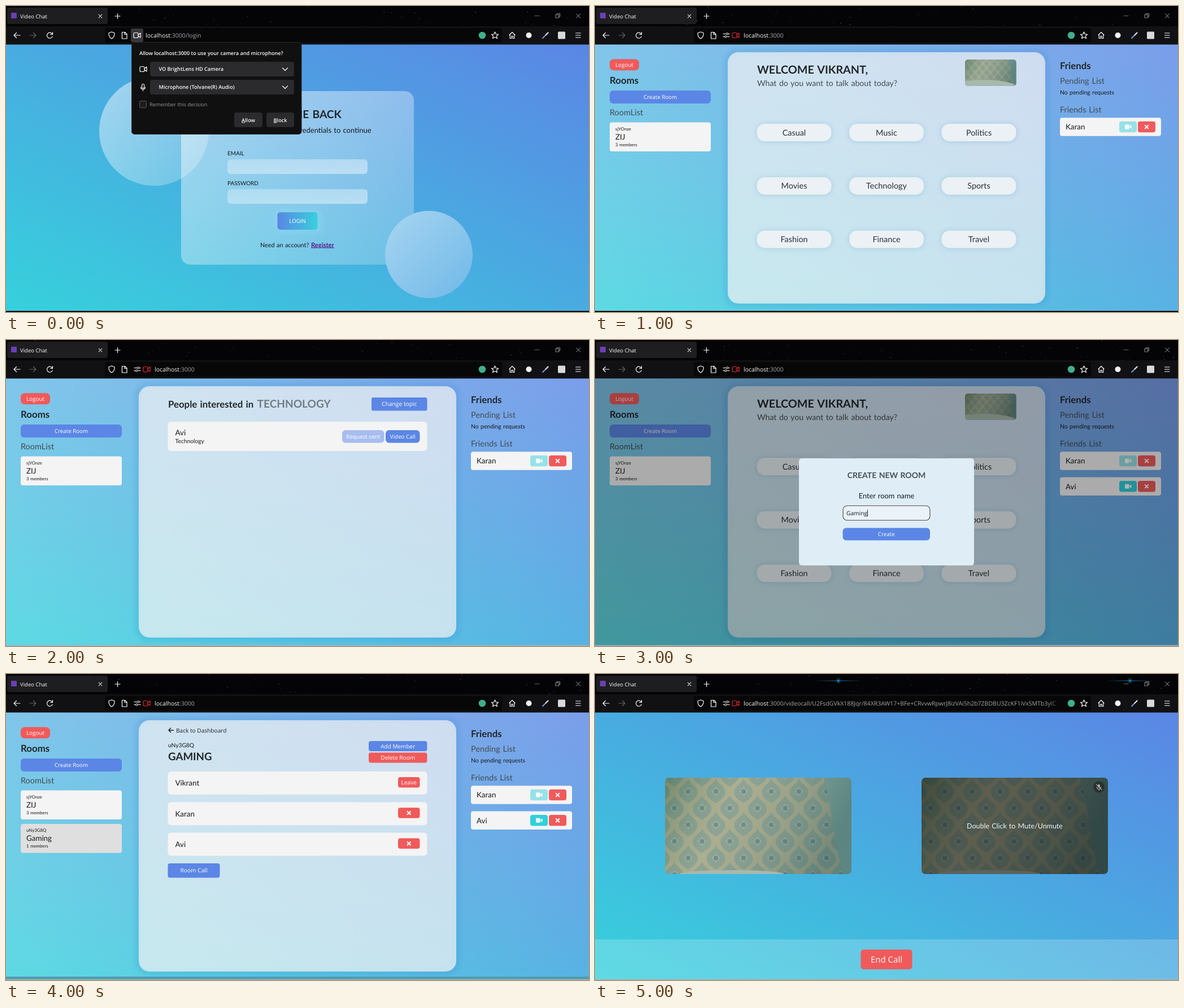
An HTML page that plays this animation: 1032x543 px, repeating every 6 s.

```html
<!DOCTYPE html>
<html lang="en">
<head>
<meta charset="utf-8">
<title>Video Chat</title>
<style>
html, body { margin: 0; width: 100%; height: 100%; overflow: hidden; background: #000; }
svg.stage { display: block; width: 100vw; height: 100vh; }
text { text-rendering: geometricPrecision; white-space: pre; }
.ui { font-family: "Open Sans", "Noto Sans", sans-serif; }
.app { font-family: Lato, "Open Sans", sans-serif; word-spacing: .07em; }
.mid { text-anchor: middle; }
.end { text-anchor: end; }
.b { font-weight: 700; }
.sb { font-weight: 600; }
.line { fill: none; stroke: #fbfbfe; stroke-width: 1.2; stroke-linecap: round; stroke-linejoin: round; }
.scene { visibility: hidden; animation: show 6s step-end infinite; }
@keyframes show {
  0% { visibility: visible; }
  16.667%, 100% { visibility: hidden; }
}
</style>
</head>
<body>
<svg class="stage" viewBox="0 0 1032 543" preserveAspectRatio="none">
  <defs>
    <linearGradient id="sky" x1="0" y1="1" x2="1" y2="0">
      <stop stop-color="#36d1dc"/><stop offset="1" stop-color="#5b86e5"/>
    </linearGradient>
    <linearGradient id="login"><stop stop-color="#5b86e5"/><stop offset="1" stop-color="#36d1dc"/></linearGradient>
    <linearGradient id="veil" x2="1" y2="1">
      <stop stop-color="#fff" stop-opacity=".31"/><stop offset="1" stop-color="#fff" stop-opacity=".08"/>
    </linearGradient>
    <linearGradient id="glass" x2="1" y2="1">
      <stop stop-color="#fff" stop-opacity=".52"/><stop offset="1" stop-color="#fff" stop-opacity=".2"/>
    </linearGradient>
    <linearGradient id="field" x2="1" y2="1">
      <stop stop-color="#fff" stop-opacity=".28"/><stop offset="1" stop-color="#fff" stop-opacity=".46"/>
    </linearGradient>
    <linearGradient id="fade">
      <stop stop-color="#070708" stop-opacity="0"/><stop offset="1" stop-color="#070708"/>
    </linearGradient>
    <linearGradient id="shade" x2="1" y2=".25">
      <stop stop-color="#2f5a3c" stop-opacity=".42"/><stop offset=".38" stop-color="#c8cba4" stop-opacity=".2"/>
      <stop offset="1" stop-color="#3c605c" stop-opacity=".42"/>
    </linearGradient>
    <radialGradient id="glint">
      <stop stop-color="#8fe0ff"/><stop offset=".2" stop-color="#1f78a8" stop-opacity=".7"/>
      <stop offset="1" stop-color="#0a3a58" stop-opacity="0"/>
    </radialGradient>
    <pattern id="cloth" width="49" height="59" patternUnits="userSpaceOnUse" x="41" y="24">
      <rect width="49" height="59" fill="#a5a78b"/>
      <g id="bulb">
        <path d="M24.500 7C28 17 41 20 41 31S30 46 24.500 51C19 46 8 42 8 31S21 17 24.500 7Z" fill="#7f9a91"/>
        <path d="M24.500 22l8 8-8 8-8-8z" fill="#98a79a"/><circle cx="24.500" cy="30" r="4" fill="#57808a"/>
      </g>
      <use href="#bulb" x="-24.500" y="29.500"/><use href="#bulb" x="24.500" y="29.500"/>
      <use href="#bulb" x="-24.500" y="-29.500"/><use href="#bulb" x="24.500" y="-29.500"/>
    </pattern>
    <filter id="soft" x="-20%" y="-40%" width="140%" height="180%"><feGaussianBlur stdDeviation="4"/></filter>
  </defs>
</svg>
<script>
const BLUE = '#5b86e5', RED = '#f05a5b', CARD = '#f4f4f4', INK = '#16191c', DARK = '#22272b', DIM = '#444c53';
const TOP = 68.4;
const me = 'Vikrant', pal = 'Karan', peer = 'Avi', club = 'ZIJ';

const rect = (x, y, w, h, r, fill, more = '') =>
  `<rect x="${x}" y="${y}" width="${w}" height="${h}" rx="${r}" fill="${fill}" ${more}/>`;
const text = (x, y, size, str, fill = INK, cls = 'app') =>
  `<text x="${x}" y="${y}" font-size="${size}" fill="${fill}" class="${cls}">${str}</text>`;
const line = (d, more = '') => `<path class="line" d="${d}" ${more}/>`;
const disc = (x, y, r, fill, more = '') => `<circle cx="${x}" cy="${y}" r="${r}" fill="${fill}" ${more}/>`;
const button = (x, y, w, h, label, fill = BLUE, size = 10, r = 5) =>
  rect(x, y, w, h, r, fill) + text(x + w / 2, y + h / 2 + size * .36, size, label, '#fff', 'ui mid');
const cross = (x, y, r, color, width) =>
  line(`M${x - r} ${y - r}l${2 * r} ${2 * r}M${x + r} ${y - r}l${-2 * r} ${2 * r}`, `style="stroke:${color};stroke-width:${width}"`);
const removeButton = (x, y, w, h) => rect(x, y, w, h, 4, RED) + cross(x + w / 2, y + h / 2, 2.7, '#fff', 2);
const camera = (x, y, color, w = 8) =>
  `<g fill="none" stroke="${color}" stroke-width="1.2" stroke-linejoin="round">
   <rect x="${x}" y="${y - 4.5}" width="${w}" height="9" rx="2"/><path d="M${x + w} ${y - 1}l4 -3v8l-4 -3"/></g>`;

function stars(seed) {
  let s = seed * 7919 + 17, out = '';
  const rnd = () => (s = (s * 16807) % 2147483647) / 2147483647;
  rnd();
  for (let i = 0; i < 75; i++) {
    out += disc((rnd() * 1032).toFixed(1), (rnd() * 36).toFixed(1), (.3 + rnd() * .5).toFixed(2),
      '#c4ccd4', `opacity="${(.1 + rnd() * .4).toFixed(2)}"`);
  }
  return out;
}

function browser(seed, path, asking) {
  const addressX = asking ? 247 : 263;
  const left = asking
    ? rect(221, 40, 22, 24, 3, '#38383c') + camera(226, 52, '#fbfbfe')
    : line('M227 49.5h5M236 49.5h2M227 54.5h2M233 54.5h5') + disc(234, 49.5, 1.7, 'none', 'stroke="#eee"') +
      disc(231, 54.5, 1.7, 'none', 'stroke="#eee"') + camera(243, 52, '#e0282e');
  return rect(0, 0, 1032, 36, 0, '#040406') + stars(seed) + rect(0, 36, 1032, 33, 0, '#111114') +
    rect(2, 3, 178, 29, 4, '#1e1e21') + rect(9, 12, 10, 10, 1, '#6a3fb5') +
    text(25, 21.5, 9.5, 'Video Chat', '#fbfbfe', 'ui') +
    cross(167, 18, 2.8, '#ddd', 1.1) + line('M193 18h9M197.5 13.5v9') +
    line('M936 17.5h8', 'opacity=".4"') + line('M973 15.5h5.5v5.5h-5.5zM975 15v-1.5h5.5v5.5h-1.5', 'opacity=".5"') +
    cross(1013, 17.5, 3.6, '#a4a4a8', 1) +
    rect(175, 39, 703, 26, 4, '#070708') +
    line('M25 52H14M18.5 47.5L14 52l4.5 4.5') + line('M42 52h11M48.5 47.5L53 52l-4.5 4.5', 'opacity=".35"') +
    line('M82 50a5 5 0 1 0 .2 4M82.5 46.500v4h-4') +
    line('M187 46l5 1.800c.4 5 -1 8 -5 10.200c-4 -2.200 -5.400 -5.200 -5 -10.200z') +
    line('M205.500 46.500h5l3.500 3.500v8h-8.500zM210 47v3.500h3.500') + left +
    text(addressX, 56, 10.5, `localhost<tspan fill="#a4a4aa">${path}</tspan>`, '#fbfbfe', 'ui') +
    rect(800, 41, 30, 22, 0, 'url(#fade)') + rect(830, 39, 48, 26, 4, '#070708') + rect(878, 36, 154, 32, 0, '#111114') +
    disc(843, 52, 6.3, '#3fae8c') +
    line('M865.500 46l1.800 4 4.300 .4 -3.200 2.900 1 4.300 -3.900 -2.300 -3.900 2.300 1 -4.300 -3.200 -2.900 4.300 -.4z') +
    line('M891 51.500l5 -5 5 5M892.200 51v6.500h2.600v-4h2.400v4h2.600v-6.500') +
    disc(925.5, 52, 5, '#f4f4f6') +
    line('M950 57l5 -5', 'style="stroke:#6f9be0;stroke-width:2"') + line('M955.500 51.500l4 -4', 'style="stroke:#d8dce2;stroke-width:2.400"') +
    rect(977, 45.5, 13, 13, 1.5, '#d9d9dc') + line('M1008.500 48h8.500M1008.500 52h8.500M1008.500 56h8.500');
}

let clips = 0;
// "bed" raises the pale curve along the lower edge.
function photo(x, y, scale, r, bed) {
  const id = 'clip' + clips++;
  return `<g transform="translate(${x} ${y}) scale(${scale})">
    <clipPath id="${id}"><rect width="330" height="171" rx="${r}"/></clipPath>
    <g clip-path="url(#${id})">${rect(0, 0, 330, 171, 0, 'url(#cloth)')}
    <path d="M281 0H330V171H314C300 110 296 60 281 0Z" fill="#74a09d"/>
    ${rect(0, 0, 330, 171, 0, 'url(#shade)')}
    <ellipse cx="118" cy="${171 + bed * .1}" rx="${92 + bed * 2}" ry="${7 + bed * .65}" fill="#a6b9ac"/></g></g>`;
}

const page = () => rect(0, TOP, 1032, 542 - TOP, 0, 'url(#sky)');

function sidebars(friends, rooms) {
  const room = (y, id, name, count, fill) => rect(26, y, 179, 51.5, 4, fill) +
    text(36, y + 14, 7.8, id) + text(36, y + 30, 13.4, name) + text(36, y + 42, 7.8, `${count} members`);
  const friend = (y, name, color) => rect(823, y, 179, 32.5, 4, CARD) + text(833, y + 21, 13.4, name) +
    rect(928, y + 6.5, 31, 19.5, 4, color) + rect(938, y + 12.2, 7.5, 8, 1, '#fff') +
    `<path d="M946 ${y + 15.5}l3.500 -2.800v7l-3.500 -2.800z" fill="#fff"/>` + removeButton(961, y + 6.5, 31, 19.5);
  return button(26, 94.2, 52, 20, 'Logout', RED, 9.9, 7) + text(26, 138, 16.9, 'Rooms', DARK, 'app b') +
    button(26, 150, 179, 23, 'Create Room', BLUE, 9.75, 6) + text(26, 194, 14.5, 'RoomList', DIM) +
    room(206.5, 'sjYOnze', club, 3, CARD) + (rooms > 1 ? room(266, 'uNy3G8Q', 'Gaming', 1, '#dfdfdf') : '') +
    text(823, 111.5, 16.8, 'Friends', DARK, 'app b') + text(823, 137.5, 14.6, 'Pending List', DIM) +
    text(823, 157, 10.4, 'No pending requests') + text(823, 188.5, 14.5, 'Friends List', DIM) +
    friend(198.3, pal, '#96e2e8') + (friends > 1 ? friend(243.5, peer, '#30d0dc') : '');
}

function dashboard(content, friends = 1, rooms = 1) {
  return page() + rect(0, TOP, 1032, 542 - TOP, 0, 'url(#veil)') +
    rect(233, 80, 566, 450, 20, 'none', 'stroke="#2f86cf" stroke-width="9" opacity=".22" filter="url(#soft)"') +
    rect(235, 82, 562, 446, 19, CARD, 'opacity=".7"') + sidebars(friends, rooms) + content;
}

function topics() {
  const names = ['Casual', 'Music', 'Politics', 'Movies', 'Technology', 'Sports', 'Fashion', 'Finance', 'Travel'];
  return text(287, 120, 19.8, `WELCOME ${me.toUpperCase()},`, DARK, 'app b') +
    text(287, 141.5, 14.1, 'What do you want to talk about today?', DIM) + photo(655, 95, .275, 20, 60) +
    names.map((name, i) => {
      const x = 352.5 + i % 3 * 163.5, y = 224.5 + Math.floor(i / 3) * 94.7;
      return rect(x - 67, y - 16, 134, 33, 15, '#5a9fc8', 'opacity=".28" filter="url(#soft)"') +
        rect(x - 66, y - 15.5, 132, 31, 14, '#ebf1f4') + text(x, y + 5.2, 14.4, name, '#2c3136', 'app mid');
    }).join('');
}

function loginPage() {
  const select = (y, label) => rect(255, y, 255, 26, 4, '#2b2a2c') +
    text(270.5, y + 16.3, 9.1, label, '#fbfbfe', 'ui sb') + line(`M489.500 ${y + 11}l4.500 4.500 4.500 -4.500`);
  const choice = (x, w, label) => rect(x, 189, w, 26, 4, '#2b2a2c') +
    text(x + w / 2, 205.5, 9.1, `<tspan text-decoration="underline">${label[0]}</tspan>${label.slice(1)}`, '#fbfbfe', 'ui sb mid');
  const popup = rect(222.5, 64.5, 300.5, 163, 5, '#101011', 'stroke="#2a2a2c"') +
    text(236, 86.5, 9.1, 'Allow localhost:3000 to use your camera and microphone?', '#fbfbfe', 'ui sb') +
    camera(237, 112, '#fbfbfe') + select(99, 'VO BrightLens HD Camera') +
    rect(240.6, 138.5, 4, 7.5, 2, 'none', 'class="line"') + line('M238.500 144c0 5 8 5 8 0M242.500 148v2.500') +
    select(131, 'Microphone (Tolvane(R) Audio)') +
    rect(236.5, 168.5, 12, 12, 2, '#1d1d1f', 'stroke="#5a5a5e"') +
    text(254, 178, 9.1, 'Remember this decision', '#98989c', 'ui') + choice(404, 50, 'Allow') + choice(461, 49, 'Block');
  return page() + disc(262, 222, 97, 'url(#glass)') + rect(310, 151, 412, 308, 16, 'url(#glass)') +
    disc(748.5, 441, 77.5, '#4ba7e2') + disc(748.5, 441, 77.5, 'url(#glass)') +
    text(516, 198.5, 19.3, 'WELCOME BACK', DARK, 'app b mid') +
    text(646.5, 225, 13, 'Enter your credentials to continue', INK, 'app end') +
    text(392, 265, 9.95, 'EMAIL') + rect(392, 272, 248, 26, 6, 'url(#field)') +
    text(392, 318, 9.95, 'PASSWORD') + rect(392, 325, 248, 26, 6, 'url(#field)') +
    rect(473, 360, 87, 43, 9, '#8fd8f4', 'opacity=".4" filter="url(#soft)"') +
    button(480.5, 366, 71, 31, 'LOGIN', 'url(#login)', 9.8, 5) +
    text(450, 427.5, 10.8, 'Need an account?') +
    text(540, 427.5, 11.2, '<tspan text-decoration="underline">Register</tspan>', '#551a8b', 'app b') + popup;
}

const people = () =>
  text(287, 120, 16.8, 'People interested in', DARK, 'app b') + text(444.5, 120, 19.1, 'TECHNOLOGY', '#737b84', 'app b') +
  button(647, 102, 98.5, 23.5, 'Change topic', BLUE, 10.3, 3) + rect(286.5, 145, 459, 52, 6, CARD) +
  text(299.5, 168.5, 13.4, peer) + text(299.5, 183, 10.3, 'Technology') +
  button(595, 160, 74.5, 22.5, 'Request sent', '#a7bdef', 9.9, 6) + button(672, 160, 60.5, 22.5, 'Video Call', BLUE, 9.8, 6);

const modal = () =>
  rect(0, TOP, 1032, 542 - TOP, 0, '#000', 'opacity=".3"') + rect(361, 210, 310, 190, 5, '#deedf6') +
  text(516, 244.5, 14, 'CREATE NEW ROOM', '#4a5157', 'app b mid') +
  text(516, 281, 12.8, 'Enter room name', INK, 'app mid') +
  rect(437.5, 292.5, 157, 29, 8, '#fff') + rect(439, 294, 154, 26, 7, '#ebf3f9', 'stroke="#34383c" stroke-width="1.1"') +
  text(445, 311, 10.2, 'Gaming', INK, 'ui') + rect(482, 301, .8, 12, 0, '#000') +
  button(438.5, 333.5, 154.5, 22, 'Create', BLUE, 9.8, 6);

function roomPage() {
  const member = (y, name) => rect(286.5, y, 459, 41, 6, CARD) + text(299.5, y + 25.3, 13.4, name);
  return line('M296.500 99.700H288M291.500 96L288 99.700l3.500 3.700', `style="stroke:${DARK};stroke-width:1.6"`) +
    text(301, 103.5, 10.15, 'Back to Dashboard', DARK, 'ui') + text(287, 130, 10.2, 'uNy3G8Q') +
    text(287, 153, 18.7, 'GAMING', DARK, 'app b') +
    button(642, 119, 103.5, 18, 'Add Member', BLUE, 10, 4) + button(642, 139.5, 103.5, 18, 'Delete Room', RED, 10.1, 4) +
    member(173, me) + member(227.3, pal) + member(281.5, peer) +
    button(694, 183, 38.5, 18.5, 'Leave', RED, 10.2, 4) + removeButton(694, 237.3, 38.5, 18.5) + removeButton(694, 291.5, 38.5, 18.5) +
    button(286.5, 336, 92, 25.5, 'Room Call', BLUE, 10.2, 4);
}

const callPage = () =>
  page() + photo(124, 184, 1, 7, 0) + photo(578, 184, 1, 7, 0) + rect(578, 184, 330, 171, 7, '#000', 'opacity=".46"') +
  text(743, 273.5, 12.5, 'Double Click to Mute/Unmute', '#f2f4f4', 'app mid') +
  disc(892, 200.5, 10, '#2a302e') + rect(890.4, 195.5, 3.4, 6.5, 1.7, '#a9aeac') +
  line('M888.500 200.500c0 5 7 5 7 0M892 204.500v2M887.500 196l9.500 9.500', 'style="stroke:#a9aeac;stroke-width:1.1"') +
  rect(0, 471, 1032, 71, 0, '#fff', 'opacity=".2"') + button(470.5, 489, 91, 35, 'End Call', RED, 15, 5);

function glints() {
  return [431, 947].map(x => `<ellipse cx="${x}" cy="12" rx="48" ry="1.3" fill="url(#glint)"/>` +
    disc(x, 12, 6, 'url(#glint)')).join('');
}

const localPath = ':3000';
const callPath = ':3000/videocall/U2FsdGVkX188Jqr/84XR3AW17+BFe+CRvvwRpwrJ8izVAi5h2b7ZBDBU3ZcKF1iVxSMTb3ylC';
const edge = (y, fill) => rect(0, y, 1032, 543 - y, 0, fill);
const blackEdge = edge(541, '#040608'), paleEdge = edge(541.5, '#9fb5bb');
const scenes = [
  browser(1, localPath + '/login', true) + loginPage() + blackEdge,
  browser(2, localPath) + dashboard(topics()) + blackEdge,
  browser(3, localPath) + dashboard(people()) + paleEdge,
  browser(4, localPath) + dashboard(topics() + modal(), 2) + paleEdge,
  browser(5, localPath) + dashboard(roomPage(), 2, 2) + edge(537, '#4f9bb0') + paleEdge,
  browser(6, callPath) + glints() + callPage() + paleEdge
];
document.querySelector('.stage').insertAdjacentHTML('beforeend', scenes.map((body, i) =>
  `<g class="scene" style="animation-delay:${i ? i - 6 : 0}s">${body}</g>`).join(''));
</script>
</body>
</html>
```
